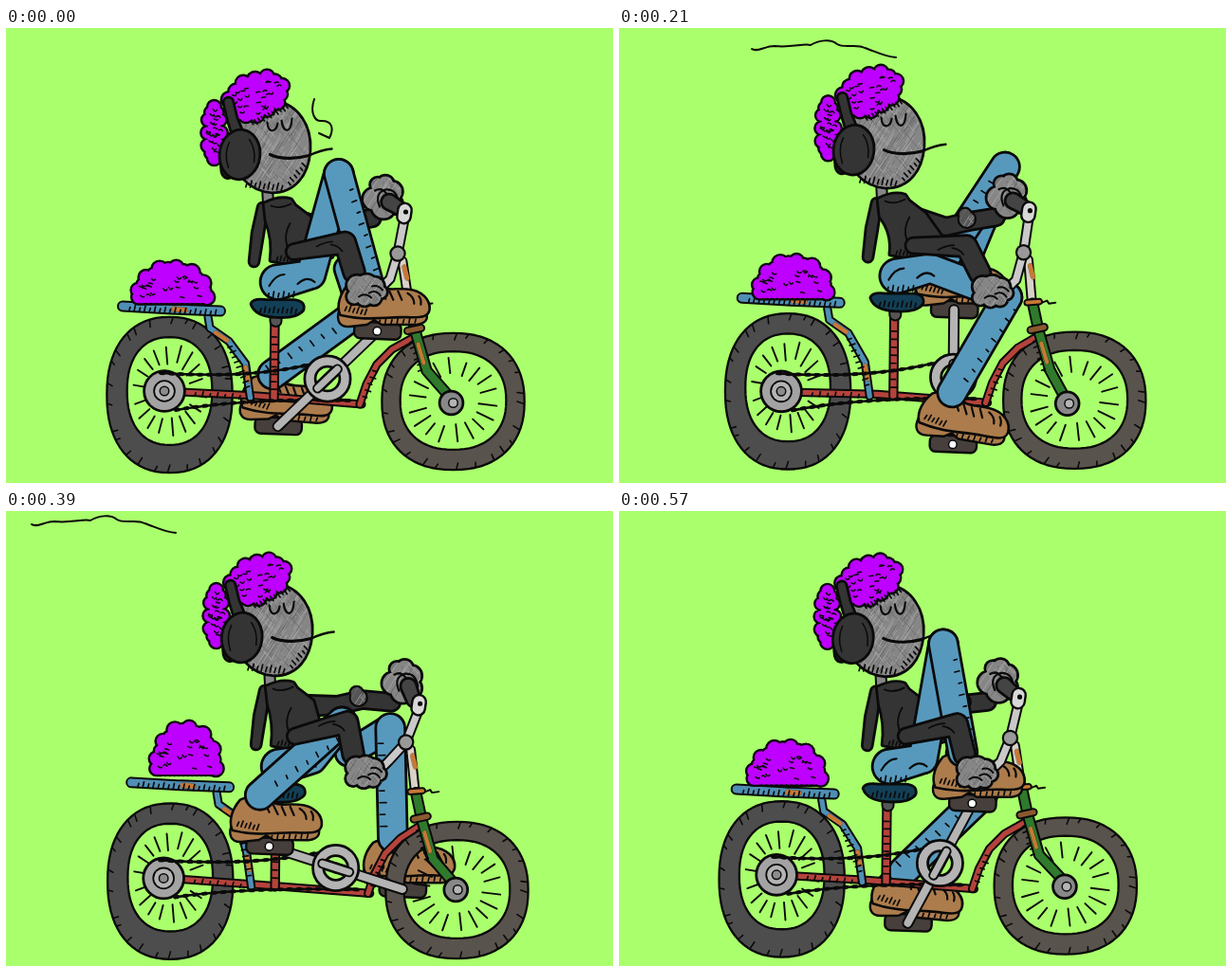
Animation, 640 px wide and 480 px high, one loop 600 ms. Source, as an HTML page with a canvas:

```html
<!DOCTYPE html>
<html lang="en">
<head>
<meta charset="utf-8">
<title>Cyclist</title>
<style>
html, body { margin: 0; width: 100%; height: 100%; overflow: hidden; background: #aaff6c; }
canvas { display: block; width: 640px; height: 480px; }
</style>
</head>
<body>
<canvas id="stage" width="640" height="480"></canvas>
<script>
const c = document.getElementById('stage').getContext('2d');
const LOOP = 600, STEP = 30, TAU = Math.PI * 2, DEG = Math.PI / 180;
const INK = '#0a0a0a', JEANS = '#5799bd', SHOE = '#ad7c4c', SKIN = '#868686',
  JACKET = '#343434', STEEL = '#b4b4b4', RED = '#b4433c', BLUE = '#4f8fb5',
  HAIR = '#bd00ff', RUST = '#c87836', FRAME = 2.6;

const rng = seed => () => (seed = (seed * 16807) % 2147483647) / 2147483647;

// Everything rides on one swing per turn of the crank
function pose(phase) {
  const s = Math.sin(phase), k = Math.cos(phase);
  const sway = (x, y, lag, lift = 4.5, push = 3, nod = -1.5) =>
    [x + push * s - lag * k, y - lift * s + nod * k];
  const p = {
    head: sway(1.5, -2, 1, 3, -.7, 1.5),
    seat: sway(288, 294.5, 2.5, 5, 3.5, 1.5),
    elbow: sway(361, 226.5, 3.5, -4.5, 4, 0),
    hand: sway(384, 275.5, 4, -1.5, 9, 0),
    wrist: sway(366, 200.5, 5.5, -3, -3, 2),
    grip: sway(408, 180.5, 10, 1.5, -5.5, 0),
    rear: sway(174.5, 387, 2, 4.5, 3, 0),
    hub: sway(168, 384.5, 1, 2.5),
    front: sway(475.5, 395.5, 4),
    axle: sway(472, 397, 2.5, 2, -1),
    crank: sway(346, 371.5, 7, 5),
    bolt: sway(429, 197.5, 8.5, 6.5, -2, -2.5),
    joint: sway(420, 239.5, 7),
    fork: sway(437, 321, 5.5, 4, 2.5),
    rack: sway(180, 291.5, 5, 1, -1.5, 5),
    pile: sway(182, 284.5, 7, -4.5, -4, 5.5),
    pileHeight: 47.5 - 4 * k - 6 * s
  };
  const spin = phase - (39 + 6 * k) * DEG;
  p.near = leg(p.crank, phase, spin, -71, 36, 198, .4);
  p.far = leg(p.crank, phase + Math.PI, spin + Math.PI, -60, 32, 222, .1);
  return p;
}

// The pedal carries the shoe, the shin rocks above it
function leg([x, y], phase, spin, lean, rock, peak, dip) {
  const pedal = [x + 74 * Math.cos(spin), y + 71 * Math.sin(spin)];
  const tilt = dip * Math.max(0, Math.cos(phase - 162 * DEG)) ** 4;
  const a = (lean + rock * Math.cos(phase - peak * DEG)) * DEG;
  const turn = (u, v) => [pedal[0] + u * Math.cos(tilt) - v * Math.sin(tilt),
    pedal[1] + u * Math.sin(tilt) + v * Math.cos(tilt)];
  const shoe = turn(7, -26), ankle = turn(-10, -54);
  const knee = [ankle[0] + 116 * Math.cos(a), ankle[1] + 116 * Math.sin(a)];
  return { pedal, shoe, ankle, knee, tilt };
}

function inked(path, fill, w = 2.8) {
  c.strokeStyle = INK;
  c.lineWidth = w * 2;
  c.stroke(path);
  c.fillStyle = fill;
  c.fill(path);
}
function line(d, w = 2.4, color = INK) {
  c.strokeStyle = color;
  c.lineWidth = w;
  c.stroke(new Path2D(d));
}
function at([x, y], angle, draw) {
  c.save();
  c.translate(x, y);
  c.rotate(angle);
  draw();
  c.restore();
}
function circles(list) {
  const p = new Path2D();
  for (const [x, y, r] of list) { p.moveTo(x + r, y); p.arc(x, y, r, 0, TAU); }
  return p;
}
function disc([x, y], r, fill, w) {
  inked(circles([[x, y, r]]), fill, w);
}
function oval(x, y, rx, ry, angle, fill) {
  const p = new Path2D();
  p.ellipse(x, y, rx, ry, angle, 0, TAU);
  inked(p, fill);
}
// Chain of tapered capsules, points are [x, y, radius]
function limb(pts, fill, w) {
  const p = new Path2D();
  for (let i = 1; i < pts.length; i++) {
    const [x, y, r] = pts[i - 1], [X, Y, R] = pts[i];
    const a = Math.atan2(Y - y, X - x), d = Math.hypot(X - x, Y - y) || 1;
    const b = Math.acos(Math.max(-1, Math.min(1, (r - R) / d)));
    p.moveTo(x + r * Math.cos(a + b), y + r * Math.sin(a + b));
    p.arc(x, y, r, a + b, a - b + TAU);
    p.arc(X, Y, R, a - b, a + b);
    p.closePath();
  }
  inked(p, fill, w);
}
const tube = (pts, r, fill, w = 2) => limb(pts.map(([x, y]) => [x, y, r]), fill, w);

function ticks(x, y, X, Y, n, len) {
  const d = Math.hypot(X - x, Y - y) || 1, nx = (y - Y) / d * len, ny = (X - x) / d * len;
  let s = '';
  for (let i = 0; i < n; i++) {
    const u = (i + .5) / n, k = .7 + .3 * (i % 2);
    s += `M${x + (X - x) * u} ${y + (Y - y) * u}l${nx * k + 1} ${ny * k}`;
  }
  line(s, 1.7);
}
function hatch(path, x, y, w, h, n, seed) {
  const rnd = rng(seed);
  c.save();
  c.clip(path);
  for (let i = 0; i < n; i++) {
    const l = 8 + rnd() * 16, lean = i % 3 ? -1.1 : .8;
    line(`M${x + rnd() * w} ${y + rnd() * h}l${l * .7} ${l * lean}`, .7, i % 2 ? '#a9a9a9' : '#686868');
  }
  c.restore();
}
function fist([x, y], list, seed) {
  const p = circles(list.map(([u, v, r]) => [x + u, y + v, r]));
  inked(p, SKIN);
  hatch(p, x - 22, y - 24, 44, 46, 65, seed);
}

// Curly hair: bumps around an ellipse, or around a dome
function curls(cx, cy, rx, ry, r, n, dome, seed) {
  const rnd = rng(seed), list = [], sweep = dome ? Math.PI : TAU;
  for (let i = 0; i <= n; i++) {
    const a = Math.PI + sweep * i / n, k = i % 2 ? 1.04 : .95;
    list.push([cx + rx * k * Math.cos(a), cy + ry * k * Math.sin(a), r * (.9 + .2 * rnd())]);
    if (dome) list.push([cx - rx + 2 * rx * i / n, cy, r * .9]);
  }
  const body = circles(list);
  body.ellipse(cx, cy, rx, ry, 0, Math.PI, Math.PI + sweep);
  inked(body, HAIR, 2.4);
  let s = '';
  for (let i = 0; i < n * 1.7; i++) {
    const a = Math.PI + sweep * rnd(), k = Math.sqrt(rnd());
    s += `M${cx + rx * k * Math.cos(a) - 2} ${cy + ry * k * Math.sin(a)}q2 ${4 - rnd() * 6} 4 1`;
  }
  line(s, 1.5);
}

function tyre([x, y], rx, ry, ix, iy, lift, color, seed) {
  const rnd = rng(seed), p = new Path2D();
  const soft = v => Math.sign(v) * Math.abs(v) ** .88;
  const spot = (a, b, t, oy = 0) => [x + a * soft(Math.cos(t)), y + oy + b * soft(Math.sin(t))];
  const ring = (a, b, oy) => {
    for (let i = 0; i < 72; i++) {
      const q = spot(a, b, TAU * i / 72, oy);
      i ? p.lineTo(...q) : p.moveTo(...q);
    }
    p.closePath();
  };
  ring(rx, ry, 0);
  ring(ix, iy, -lift);
  c.strokeStyle = INK;
  c.lineWidth = 4.6;
  c.stroke(p);
  c.fillStyle = color;
  c.fill(p, 'evenodd');
  let marks = '', spokes = '';
  for (let i = 0; i < 26; i++) {
    const a = TAU * (i + rnd() * .6) / 26, k = .9 + rnd() * .06;
    marks += `M${spot(rx * k, ry * k, a)}L${spot(rx, ry, a + .02)}`;
  }
  for (let i = 0; i < 18; i++) {
    const a = TAU * i / 18 + .1, k = .46 + rnd() * .1, m = .76 + rnd() * .1;
    spokes += `M${spot(ix * k, iy * k, a, -lift)}L${spot(ix * m, iy * m, a, -lift)}`;
  }
  line(marks, 1.6);
  line(spokes, 1.9);
}

function shoe(l) {
  at(l.shoe, l.tilt, () => {
    inked(new Path2D('M-46 5C-49 14 -46 21 -36 20L-18 18L-10 13L-2 18L34 18C46 17 46 10 42 4Z'), SHOE, 2.4);
    inked(new Path2D('M-45 8C-49 -2 -44 -14 -37 -22C-30 -26 -14 -26 -6 -20C2 -15 12 -18 24 -17C40 -16 48 -6 47 3C46 12 34 10 18 10C0 10 -20 14 -45 8Z'), SHOE, 2.6);
    line('M-12 -20l5 10M-3 -18l5 10M6 -16l4 9M15 -16l4 9M25 -14q7 4 7 11M37 -11q3 4 2 9', 2.2);
    ticks(-43, 4, -18, 9, 6, -6);
    ticks(-8, 18, 36, 17, 7, -5);
  });
}
function pedal(l, dot) {
  at(l.pedal, .04, () => {
    const p = new Path2D();
    p.roundRect(-23, -8, 47, 15, 5);
    inked(p, '#463f3c', 2.4);
    if (dot) disc([0, 0], 3.5, '#fff', 1.5);
  });
}
function shin({ knee: [x, y], ankle: [X, Y] }, side) {
  limb([[x, y, 14], [X, Y, 14]], JEANS);
  ticks(x + side * 13, y + 10, X + side * 13, Y - 6, 8, side * 6);
}

function farSide(p) {
  limb([[p.seat[0] + 74, p.seat[1] - 42, 12], [...p.far.knee, 13]], JEANS);
  pedal(p.far, false);
  shoe(p.far);
  shin(p.far, -1);
}

function farArm(p) {
  const [wx, wy] = p.wrist, [gx, gy] = p.grip;
  limb([[310 + p.head[0], 206 + p.head[1], 10], [wx - 22, wy + 8, 8], [wx + 4, wy + 2, 8], [gx - 12, gy + 20, 8]], JACKET);
  const watch = circles([[wx, wy, 8], [wx - 2, wy - 5, 6]]);
  inked(watch, '#555', 2.2);
  hatch(watch, wx - 12, wy - 12, 24, 26, 16, 31);
  fist(p.grip, [[-10, 0, 11], [-6, -15, 7], [2, -16, 8], [9, -8, 10], [9, 5, 10], [0, 8, 12], [0, -5, 12]], 12);
  line(`M${gx - 9} ${gy - 9}q7 -4 12 3M${gx - 4} ${gy + 8}q-6 -14 6 -18q12 -1 14 14`, 2.2);
  limb([[gx + 6, gy + 3, 7], [p.bolt[0] - 6, p.bolt[1] - 5, 6]], '#444');
}

function frame(p) {
  const [sx, sy] = p.seat, [cx, cy] = p.crank, [hx, hy] = p.hub, [fx, fy] = p.fork, base = cy + 20;
  tube([[hx + 18, hy + 1], [sx - 20, base - 2], [cx + 36, cy + 27]], FRAME, RED);
  ticks(hx + 28, hy + 5, sx - 28, base + 2, 8, -5);
  tube([[cx + 34, cy + 27], [cx + 41, cy + 6], [cx + 52, cy - 15], [cx + 68, cy - 31], [fx - 2, fy + 7]], FRAME, RED);
  ticks(cx + 36, cy + 22, cx + 49, cy - 12, 5, 5);
  tube([[sx - 2, sy + 10], [sx - 3, base]], FRAME + .6, RED);
  tube([[sx - 1, sy + 8], [sx - 1, sy + 13]], 5, '#555');
  ticks(sx - 5, sy + 26, sx - 6, base - 5, 8, -6);
}

function carrier(p) {
  const [x, y] = p.rack, fx = p.seat[0] - 28, fy = p.crank[1] + 20;
  tube([[x + 38, y + 8], [x + 40, y + 20], [x + 60, y + 34], [fx - 5, fy - 36], [fx, fy]], FRAME, BLUE);
  tube([[x + 46, y + 25], [x + 58, y + 33]], 2.2, RUST, .2);
  tube([[fx - 5, fy - 32], [fx - 2, fy - 18]], 2.2, RUST, .2);
  ticks(x + 58, y + 38, fx - 4, fy - 8, 9, -5);
  tube([[x - 52, y - 3], [x, y], [x + 51, y + 2]], 4, BLUE);
  tube([[x + 2, y], [x + 14, y + 1]], 2.6, RUST, .2);
  ticks(x - 48, y + 2, x + 48, y + 7, 18, -6);
  const h = p.pileHeight;
  curls(p.pile[0], p.pile[1] - 6, 36 - (h - 42) * .42, h - 13, 7, 13, true, 77);
}

function chain(p) {
  const [hx, hy] = p.hub, [cx, cy] = p.crank;
  disc(p.hub, 20, '#a3a3a3');
  disc(p.hub, 10, STEEL, 1.8);
  disc(p.hub, 4, '#8c8c8c', 1.5);
  const d = `M${hx - 4} ${hy - 19}Q${hx + 100} ${hy - 12} ${cx - 4} ${cy - 19}M${hx + 12} ${hy + 20}Q${hx + 90} ${cy + 20} ${cx + 24} ${cy + 23}`;
  line(d, 2.6);
  c.setLineDash([3, 7]);
  line(d, 4);
  c.setLineDash([]);
}

function fork(p) {
  const [jx, jy] = p.joint, [fx, fy] = p.fork, [ax, ay] = p.axle;
  tube([[jx + 5, jy + 8], [fx - 7, fy - 30]], 3.4, '#d9d2c8');
  tube([[jx + 7, jy + 14], [jx + 10, jy + 26]], 2.4, RUST, .2);
  tube([[fx - 6, fy - 28], [fx, fy], [fx + 12, fy + 42], [ax - 4, ay - 9]], 4.2, '#2f7a2c');
  tube([[fx + 3, fy + 14], [fx + 9, fy + 34]], 2, RUST, .2);
  ticks(fx - 4, fy + 8, fx + 8, fy + 44, 6, 5);
  tube([[fx - 8, fy], [fx + 6, fy - 3]], 2.6, '#8a5a30');
  tube([[fx - 12, fy - 29], [fx + 1, fy - 30]], 1.8, RUST);
  line(`M${fx + 4} ${fy - 29}l5 -2l2 3l7 -1`, 2);
  disc(p.axle, 11, '#888');
  disc([ax + 2, ay], 4, STEEL, 1.5);
}

function cranks(p) {
  const [x, y] = p.crank, [px, py] = p.near.pedal;
  const ring = (w, color) => {
    const path = circles([[x, y, 18.5]]);
    c.strokeStyle = color;
    c.lineWidth = w;
    c.stroke(path);
  };
  tube([p.crank, p.far.pedal], 4, STEEL);
  tube([p.crank, p.near.pedal], 4, STEEL);
  ring(14, INK);
  ring(8.5, STEEL);
  tube([[x - (px - x) * .2, y - (py - y) * .2], [x + (px - x) * .2, y + (py - y) * .2]], 3.4, STEEL);
}

function bike(p) {
  tyre(p.rear, 65, 81, 46, 58, 4, '#4d4d4d', 7);
  tyre(p.front, 74, 71, 57, 53, 1, '#59534e', 9);
  frame(p);
  carrier(p);
  chain(p);
  fork(p);
  cranks(p);
}

function torso(p) {
  const [dx, dy] = p.head, ex = p.seat[0] - 286, ey = p.seat[1] - 298;
  const top = (x, y) => `${x + dx} ${y + dy} `, low = (x, y) => `${x + ex} ${y + ey} `;
  tube([[275 + dx, 168 + dy], [276 + dx, 186 + dy]], 4.5, SKIN);
  limb([[270 + dx, 190 + dy, 4], [265 + dx, 217 + dy, 5], [261 + dx, 247 + dy, 4]], JACKET);
  inked(new Path2D('M' + top(272, 186) + 'Q' + top(288, 178) + top(300, 182) + 'L' + top(304, 188) + top(321, 201)
    + low(329, 222) + low(344, 243) + 'Q' + low(312, 254) + low(280, 247) + 'Q' + low(283, 225) + top(274, 204) + 'Z'), JACKET);
  line('M' + top(279, 188) + 'q10 4 21 -2M' + low(300, 208) + 'q-7 12 -3 24', 1.8);
  ticks(284 + ex, 247 + ey, 318 + ex, 249 + ey, 9, -5);
}

function head(p) {
  at(p.head, 0, () => {
    const face = new Path2D('M240 120C240 92 262 78 284 79C306 82 321 104 319 130C317 156 303 173 280 173C258 171 238 156 240 120Z');
    inked(face, SKIN);
    hatch(face, 236, 78, 84, 104, 230, 5);
    line('M275 100C276 112 284 111 286 101M290 98C292 112 300 112 301 96', 2.2);
    line('M278 134C290 140 308 138 319 135', 3.2);
    line('M319 135Q332 129 343 128', 2.4);
    ticks(250, 168, 292, 172, 9, -7);
    ticks(298, 168, 317, 145, 6, -6);
    curls(219, 111, 7, 26, 6, 12, false, 19);
    at([263, 73], -.4, () => curls(0, 0, 29, 18, 7, 14, false, 43));
    ticks(256, 100, 296, 81, 11, 5);
    limb([[234, 79, 4], [238, 96, 4], [245, 116, 5]], JACKET);
    oval(236, 143, 8, 15, .25, '#222');
    oval(246, 134, 20, 25, .12, JACKET);
    line('M235 121q-6 12 -1 27M256 118q7 10 5 24', 1.5);
  });
}

function nearSide(p) {
  const [sx, sy] = p.seat;
  limb([[sx + 1, sy - 28, 17], [sx + 36, sy - 36, 14], [...p.near.knee, 14]], JEANS);
  line(`M${sx - 8} ${sy - 24}q7 -12 16 -12M${sx + 22} ${sy - 26}q10 -9 18 -2`, 2.2);
  ticks(sx - 12, sy - 12, sx + 20, sy - 12, 6, -6);
  inked(new Path2D(`M${sx - 26} ${sy - 5}q2 -5 16 -3h28q11 1 9 9q-6 8 -27 7q-22 -1 -26 -13Z`), '#123f55');
  ticks(sx - 20, sy + 4, sx + 22, sy + 5, 9, -6);
  pedal(p.near, true);
  shoe(p.near);
  shin(p.near, 1);
}

function nearArm(p) {
  const [hx, hy] = p.hand, [ex, ey] = p.elbow, [bx, by] = p.bolt;
  limb([[p.seat[0] + 18, p.seat[1] - 60, 7], [ex, ey, 10], [hx - 13, hy - 18, 10]], JACKET);
  line(`M${ex - 15} ${ey + 2}q8 1 12 7M${ex - 30} ${ey + 4}q9 -5 17 -5`, 1.6);
  tube([[bx, by + 4], p.joint, [hx + 25, hy - 11], [hx + 12, hy + 2]], 3.6, '#c9c9c9');
  disc(p.joint, 6.5, '#999', 2.2);
  tube([[bx, by - 3], [bx - 1, by + 4]], 6, '#d8d8d8', 2.4);
  disc([bx + 1, by - 1], 1.6, INK, 1);
  fist(p.hand, [[-10, -4, 10], [0, -4, 11], [9, -3, 9], [15, 3, 6], [8, 9, 7], [-2, 9, 8], [-13, 8, 7]], 23);
  line(`M${hx - 8} ${hy + 8}q7 -5 13 1M${hx + 3} ${hy + 4}q7 -4 12 3M${hx + 6} ${hy - 3}q6 -2 11 4`, 2);
}

// A puff jumps back in three strokes as the wind takes it
function smoke(t) {
  if (t < 60) line('M325 75c-5 15 1 24 8 23c11 0 13 8 8 18l-11 -5', 2);
  else if (t < 180) line(`M${t < 120 ? 284 : 280} 38c6 12 15 12 23 10c12 -3 13 20 17 36`, 2);
  else if (t < 420) {
    const x = t < 240 ? 140 : t < 360 ? 113 + (t - 270) / 20 : 27;
    line(`M${x} ${t < 360 ? 22 : 14}c5 4 14 -3 24 -3c18 2 30 -3 38 -1c8 -5 21 -7 28 -1c8 5 20 -1 29 4c10 3 20 9 33 10`, 2);
  }
}

function draw(t) {
  c.fillStyle = '#aaff6c';
  c.fillRect(0, 0, 640, 480);
  c.lineCap = c.lineJoin = 'round';
  const p = pose(TAU * t / LOOP);
  smoke(t);
  for (const part of [farSide, farArm, bike, torso, head, nearSide, nearArm]) part(p);
}

function tick() {
  draw(Math.floor(performance.now() % LOOP / STEP) * STEP);
  requestAnimationFrame(tick);
}
tick();
</script>
</body>
</html>
```
